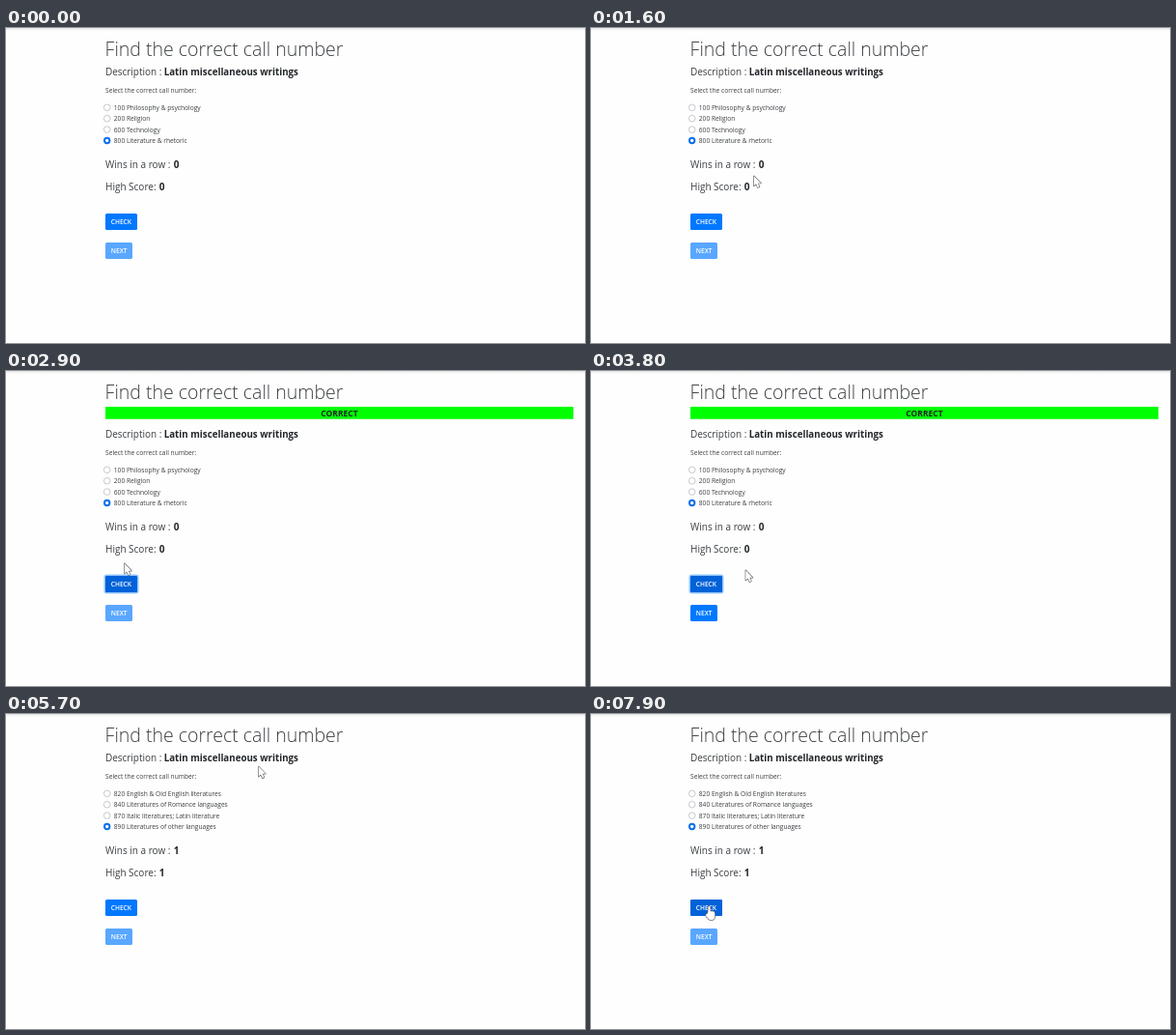
An HTML page with a canvas that plays this animation: 600x326 px, repeating every 8000 ms.

```html
<!DOCTYPE html>
<html lang="en">
<head>
<meta charset="utf-8">
<title>Call number quiz</title>
<style>
  html, body { margin: 0; width: 100%; height: 100%; overflow: hidden; background: #fefefe; }
  canvas { display: block; width: 600px; height: 326px; }
</style>
</head>
<body>
<canvas id="stage"></canvas>
<script>
const W = 600, H = 326, LOOP = 8000, STEP = 100, LEFT = 103;
const canvas = document.getElementById('stage');
const ctx = canvas.getContext('2d');
const dpr = window.devicePixelRatio || 1;
canvas.width = W * dpr;
canvas.height = H * dpr;

const FONT = '"Open Sans", "Noto Sans", sans-serif';
const PAPER = '#fefefe', INK = '#212529', SOFT = '#3a3e42';
const BLUE = '#0078ff', DARK = '#0062d9';

const SHOW_BANNER = 2900, NEXT_ROUND = 4100, FADE = 150, SHIFT = 20;
const CHECK = { label: 'CHECK', y: 192, w: 33 };
const NEXT = { label: 'NEXT', y: 222, w: 28 };

const ROUNDS = [
  ['100 Philosophy & psychology', '200 Religion', '600 Technology', '800 Literature & rhetoric'],
  ['820 English & Old English literatures', '840 Literatures of Romance languages',
   '870 Italic literatures; Latin literature', '890 Literatures of other languages']
];

// Places the pointer visits
const entry = { x: 393, y: 284 }, title = { x: 300, y: 21 }, choices = { x: 214, y: 80 };
const answer = { x: 278, y: 45 }, aside = { x: 245, y: 125 }, below = { x: 145, y: 209 };
const check = { x: 122.5, y: 199 }, next = { x: 118, y: 246 };
const rest = { x: 160, y: 206 }, beside = { x: 141, y: 193 };

// Arrival times; the pointer eases from each place to the next
const TOUR = [
  [100, entry], [500, title], [900, choices], [1200, title], [1800, check],
  [2100, aside], [2300, below], [2700, check], [3300, check], [3600, title],
  [3800, rest], [4000, next], [4200, rest], [5200, rest], [5600, answer],
  [5900, choices], [6300, answer], [6700, beside], [7600, check], [LOOP + 1, check]
];

const clamp = v => Math.min(1, Math.max(0, v));
const ease = k => k * k * (3 - 2 * k);

function pointer(t) {
  if (t < TOUR[0][0]) return null;
  const i = TOUR.findIndex(stop => stop[0] > t);
  const [t0, a] = TOUR[i - 1], [t1, b] = TOUR[i];
  const k = ease((t - t0) / (t1 - t0));
  return { x: a.x + (b.x - a.x) * k, y: a.y + (b.y - a.y) * k };
}

const hasBanner = t => t >= SHOW_BANNER && t < NEXT_ROUND;
const offset = t => hasBanner(t) ? SHIFT : 0;

function isOver(button, t) {
  const p = pointer(t);
  if (!p) return false;
  const dx = p.x - LEFT, dy = p.y - button.y - offset(t);
  return dx >= 0 && dx <= button.w && dy >= 0 && dy <= 17;
}
const hover = (button, t) => (isOver(button, t) + isOver(button, t - STEP)) / 2;

function text(str, x, y, size, weight = 400, color = weight > 400 ? INK : SOFT) {
  ctx.font = `${weight} ${size}px ${FONT}`;
  ctx.fillStyle = color;
  ctx.fillText(str, x, y);
}

function box(x, y, w, h, r, fill, alpha = 1) {
  ctx.globalAlpha = alpha;
  ctx.beginPath();
  ctx.roundRect(x, y, w, h, r);
  ctx.fillStyle = fill;
  ctx.fill();
  ctx.globalAlpha = 1;
}

function ring(x, y, r, width, color) {
  ctx.beginPath();
  ctx.arc(x, y, r, 0, Math.PI * 2);
  ctx.fillStyle = '#fff';
  ctx.fill();
  ctx.strokeStyle = color;
  ctx.lineWidth = width;
  ctx.stroke();
}

function drawButton({ label, y, w }, dark, alpha = 1) {
  box(LEFT, y, w, 17, 1.5, BLUE, alpha);
  box(LEFT, y, w, 17, 1.5, DARK, dark);
  text(label, LEFT + 5.8, y + 10.8, 6.6, 600, '#fff');
}

function drawButtons(t) {
  const banner = hasBanner(t);
  if (banner) box(LEFT - 1.5, CHECK.y - 1.5, CHECK.w + 3, 20, 3, '#268fff', 0.5);
  drawButton(CHECK, banner ? 1 : hover(CHECK, t));

  const enabled = banner ? clamp((t - SHOW_BANNER) / FADE)
    : t < NEXT_ROUND ? 0 : clamp(1 - (t - NEXT_ROUND) / FADE);
  drawButton(NEXT, banner ? hover(NEXT, t) : 0, 0.65 + 0.35 * enabled);
}

const ARROW = new Path2D('M.3 .3V10.7L2.6 8.5L4.3 12.3L6 11.5L4.4 7.8H7.5Z');
const HAND = new Path2D();
HAND.roundRect(-1, 0, 2, 10, 1);
HAND.roundRect(-3.3, 7.5, 4, 4, 1.5);
HAND.roundRect(-1.5, 5.3, 7.2, 8.7, [1, 2, 3, 3]);

function drawPointer(t) {
  const p = pointer(t);
  if (!p) return;
  const hand = isOver(CHECK, t) || (hasBanner(t) && isOver(NEXT, t));
  const shape = hand ? HAND : ARROW;
  ctx.save();
  ctx.translate(p.x, p.y);
  ctx.lineJoin = 'round';
  ctx.strokeStyle = '#66666c';
  ctx.lineWidth = 1.3;
  ctx.stroke(shape);
  ctx.fillStyle = '#fff';
  ctx.fill(shape);
  ctx.restore();
}

function drawPage() {
  ctx.fillStyle = PAPER;
  ctx.fillRect(0, 0, W, H);
  const shade = ctx.createLinearGradient(0, 0, 0, 3);
  shade.addColorStop(0, '#e4e5e7');
  shade.addColorStop(1, PAPER);
  ctx.fillStyle = shade;
  ctx.fillRect(0, 0, W, 3);
  text('Find the correct call number', LEFT - 0.4, 28.6, 19.5, 300);
}

function drawBanner() {
  ctx.fillStyle = '#00ff00';
  ctx.fillRect(LEFT, 37, 485, 12.7);
  ctx.textAlign = 'center';
  text('CORRECT', LEFT + 242.5, 46.5, 8.5, 700);
  ctx.textAlign = 'left';
}

function drawQuiz(round) {
  text('Description :', LEFT, 48.5, 9.95);
  text('Latin miscellaneous writings', 163.7, 48.5, 9.75, 700);
  text('Select the correct call number:', LEFT, 66.9, 6.68);
  ROUNDS[round].forEach((label, i) => {
    const y = 82.3 + i * 11.4;
    if (i === 3) ring(104.7, y, 2.7, 2, '#0870ee');
    else ring(104.7, y, 3.3, 0.8, '#b8bac2');
    text(label, 111.8, y + 2.4, 6.63);
  });
  text('Wins in a row :', LEFT, 144.8, 10);
  text(String(round), 173.8, 144.8, 10, 700);
  text('High Score:', LEFT, 167.8, 10);
  text(String(round), 158.8, 167.8, 10, 700);
}

function draw(t) {
  ctx.setTransform(dpr, 0, 0, dpr, 0, 0);
  drawPage();
  if (hasBanner(t)) drawBanner();
  ctx.save();
  ctx.translate(0, offset(t));
  drawQuiz(t >= NEXT_ROUND ? 1 : 0);
  drawButtons(t);
  ctx.restore();
  drawPointer(t);
}

const start = performance.now();
function tick() {
  const t = (performance.now() - start) % LOOP;
  draw(Math.floor(t / STEP) * STEP);
  requestAnimationFrame(tick);
}
tick();
</script>
</body>
</html>
```
